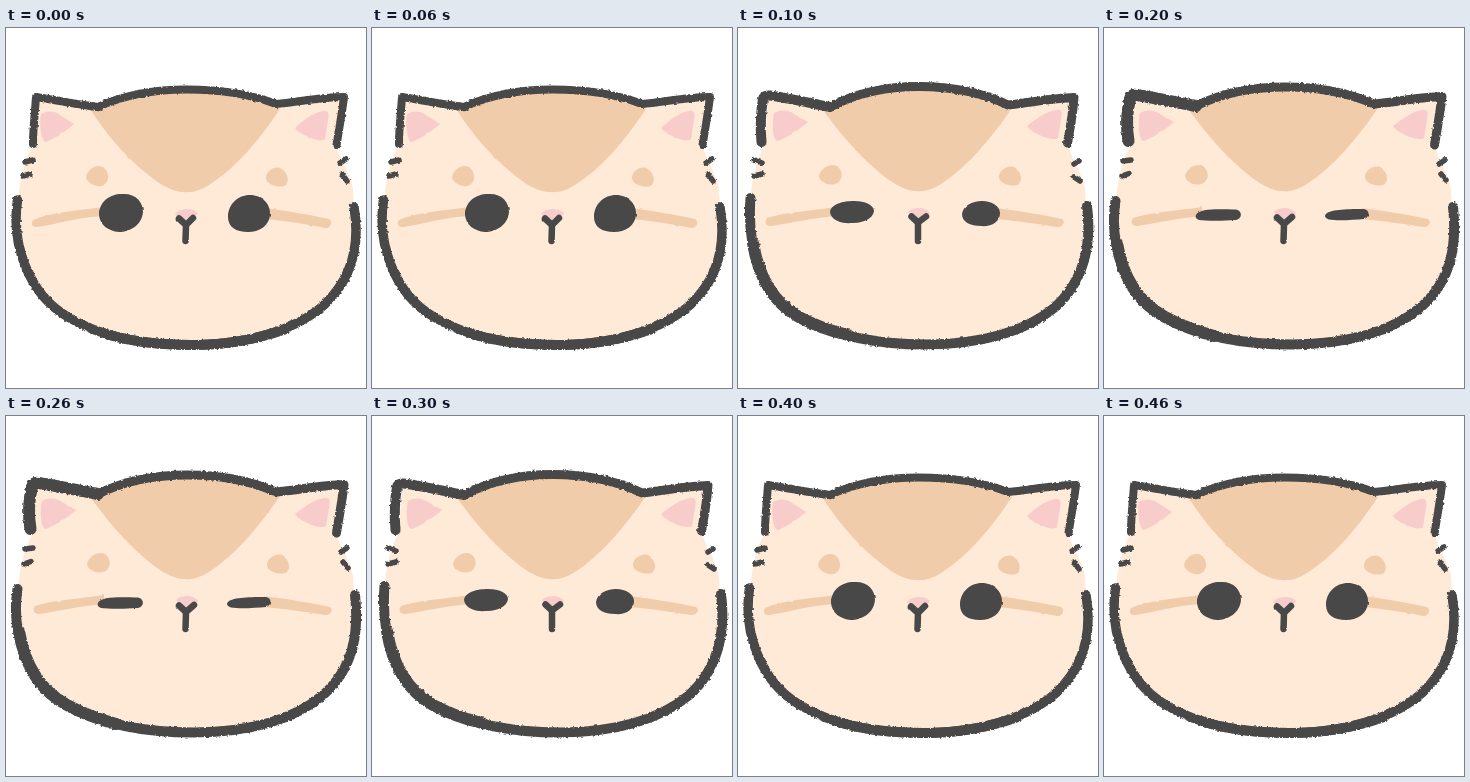
An HTML page for the animation above (0.5 s loop, 360x360 px).

```html
<!DOCTYPE html>
<html lang="en">
<head>
<meta charset="utf-8">
<title>Blinking cat</title>
<style>
  html, body { margin: 0; width: 100%; height: 100%; overflow: hidden; background: #fff; }
  svg { display: block; width: 100vw; height: 100vh; }
  .ink { fill: none; stroke: #484848; stroke-linecap: round; stroke-linejoin: round; }
  .dark { fill: #484848; }
  .tan { fill: #f0ccaa; }
  .pink { fill: #f9cccc; }
</style>
</head>
<body>
<svg viewBox="0 0 360 360">
  <defs>
    <filter id="rough" filterUnits="userSpaceOnUse" x="0" y="0" width="360" height="360" color-interpolation-filters="sRGB">
      <feTurbulence id="grain" type="fractalNoise" baseFrequency="0.38" numOctaves="2" seed="3"/>
      <feDisplacementMap in="SourceGraphic" scale="3" xChannelSelector="R" yChannelSelector="G"/>
    </filter>
    <filter id="soft" filterUnits="userSpaceOnUse" x="0" y="0" width="360" height="360" color-interpolation-filters="sRGB">
      <feTurbulence type="fractalNoise" baseFrequency="0.12" numOctaves="2" seed="8"/>
      <feDisplacementMap in="SourceGraphic" scale="2" xChannelSelector="R" yChannelSelector="G"/>
    </filter>
  </defs>
  <g fill="#ffe9d7">
    <path id="brow"/>
    <path id="cheeks"/>
  </g>
  <g filter="url(#soft)">
    <path id="crown" class="tan"/>
    <path id="marks" class="tan"/>
    <path id="ears" class="pink"/>
    <path id="nose" class="pink"/>
  </g>
  <g class="ink" filter="url(#rough)">
    <path id="top"/>
    <path id="leftEar"/>
    <path id="jaw"/>
    <path id="chin"/>
    <path id="tufts" stroke-width="5.5"/>
  </g>
  <path id="mouth" class="ink" stroke-width="6.5" filter="url(#soft)"/>
  <path id="eyes" class="dark" filter="url(#soft)"/>
</svg>
<script>
const STEP = 100;
const ORDER = [0, 1, 2, 1, 0];

const open = {
  seed: 3, topWidth: 8, earWidth: 8, jawWidth: 9.5, chinWidth: 10,
  leftEar: 'M27 116 C27 100 29 84 30 69 C50 72 72 77 92 79',
  top: 'M92 79 C120 66 149 61.5 181 61.5 C215 61.5 244 66 270 76 C292 74 316 69 338 69 C336 85 333 102 330.5 117',
  jaw: 'M11.5 172 C5 215 22 266 62 289 C95 309 135 317 188 317 C245 317 292 300 318 277 C347 250 354 215 348 179',
  chin: 'M100 306 C126 314 156 317 188 317 C222 317 254 310 280 301',
  tufts: 'M19 134 L27 132 M17 148 L24 146 M334 135 L340 131 M336 146 L341 153',
  crown: 'M84 81 C100 106 124 135 153 155 C172 167 187 167 203 157 C231 139 253 112 274 81 C220 54 138 54 84 81Z',
  marks: 'M80 149 C82 141 90 136 97 139 C104 144 104 155 96 158 C89 159 81 155 80 149Z' +
    'M260 150 C260 143 268 138 274 140 C281 143 284 153 280 157 C275 161 260 157 260 150Z' +
    'M27 192 C45 184 70 183 97 179 L97 188 C72 189 52 196 31 199 C25 199 25 195 27 192Z' +
    'M260 180 C282 183 304 187 323 191 C327 194 325 200 319 200 C301 196 280 193 260 191Z',
  ears: 'M35 86 C42 82 50 83 54 87 L68 96 C60 103 50 110 40 114 C35 114 33 94 35 86Z' +
    'M289 100 C298 92 306 85 317 83 C323 82 323 87 322 92 L319 111 C316 116 294 107 289 100Z',
  nose: 'M169 186 C173 180 187 179 192 185 C189 190 181 195 175 192Z',
  mouth: 'M173 190.5 L180 197 L187 190 M180 197 L179.5 213',
  eyes: 'M93 187 C93 173 105 165 118 166 C130 166 137 174 137 184 C136 197 124 204 113 204 C102 203 94 197 93 187Z' +
    'M222 189 C222 176 232 167 244 167 C256 167 265 176 264 187 C263 198 253 204 242 204 C230 204 222 199 222 189Z'
};

const half = {
  ...open,
  seed: 17, topWidth: 9, earWidth: 10, jawWidth: 10, chinWidth: 12,
  leftEar: 'M23.5 114 C22 98 23 83 25 71 Q26 67 32 67.5 C52 70 74 76 92 79',
  top: 'M92 79 C120 64 148 58.5 181 58.5 C215 58.5 245 65 270 77 C291 75 314 70 336 69.5 C335 85 332 101 329.5 115',
  jaw: 'M12.5 170 C9 214 21 266 61 289 C95 307 135 316.5 188 316.5 C242 316 287 304 316 280 C346 254 354 216 349 178',
  chin: 'M15 215 C21 252 38 276 61 289 C76 297 92 303 110 307',
  tufts: 'M16 132 L24 135 M16 148 L24 146 M336 136 L341 133 M336 149 L342 153',
  crown: 'M85 82 C101 104 125 134 154 154 C173 166 186 166 203 156 C230 138 252 112 274 80 C220 52 138 52 85 82Z',
  marks: 'M81 148 C83 140 92 135 99 138 C106 143 105 154 97 156 C90 158 82 154 81 148Z' +
    'M261 149 C261 142 270 137 276 139 C283 143 285 152 281 156 C276 160 261 156 261 149Z' +
    'M29 190 C48 184 72 183 98 179 L98 188 C73 190 53 195 34 198 C26 198 27 193 29 190Z' +
    'M258 180 C282 183 305 187 324 191 C328 194 325 199 319 199 C301 196 280 193 258 191Z',
  ears: 'M36 85 C43 81 51 82 56 86 L70 94 C61 102 50 109 40 113 C34 113 34 93 36 85Z' +
    'M289 98 C298 91 307 84 318 82 C325 81 324 86 323 92 L320 110 C316 114 294 106 289 98Z',
  nose: 'M170 184 C174 179 187 178 192 185 C189 189 181 194 175 191Z',
  mouth: 'M173.5 188.5 L180 194.5 L188 188.5 M180 194.5 L180 213',
  eyes: 'M92 184 C93 176 105 173 116 173 C127 173 136 177 136 183 C135 191 125 195 114 195 C103 196 93 192 92 184Z' +
    'M224 186 C225 178 234 173 244 173 C254 173 262 178 262 185 C262 194 253 199 243 198 C232 198 224 194 224 186Z'
};

const shut = {
  ...half,
  seed: 29, earWidth: 12,
  leftEar: 'M24.5 113 C22 98 23 83 26 71 Q27 66 33 67 C52 70 74 75 92 78',
  top: 'M92 78 C120 64 148 59 181 59 C215 59 245 65 270 76 C292 74 316 69 338 68.5 C336 85 333 102 330.5 117',
  jaw: 'M11.5 173 C5 214 20 267 61 289 C95 308 135 316.5 188 316.5 C245 316 289 303 317 279 C348 252 353 216 349 179',
  chin: 'M13 215 C19 252 37 276 61 289 C76 297 92 303 110 308',
  tufts: 'M19 133 L27 132 M18 148 L25 145.5 M335 136 L341 132 M337 146 L342 152',
  mouth: 'M173 189.5 L180 196 L188 189 M180 196 L179.5 213',
  eyes: 'M92 187 C94 180 116 181 132 181.5 C139 183 138 191 132 192 C118 193 102 193 95 192 C92 191 91 189 92 187Z' +
    'M222 186 C227 181 246 181 260 181 C266 182 266 189 260 191 C249 192 233 193 225 191.5 C221 190 220 188 222 186Z'
};

const poses = [open, half, shut];
const $ = id => document.getElementById(id);
const pathIds = ['leftEar', 'top', 'jaw', 'chin', 'tufts', 'crown', 'marks', 'ears', 'nose', 'mouth', 'eyes'];
const widths = { leftEar: 'earWidth', top: 'topWidth', jaw: 'jawWidth', chin: 'chinWidth' };

// Upper half of the face, with the cheeks that have no ink line.
const browPath = p => p.top +
  ' C334 133 343 142 347 160 L348 182 L12 182 C13 153 17 136 27 116 L30 70Z';

let shown = -1;
function draw(time) {
  const index = ORDER[Math.floor(time / STEP) % ORDER.length];
  if (index === shown) return;
  shown = index;
  const p = poses[index];
  for (const id of pathIds) $(id).setAttribute('d', p[id]);
  for (const id in widths) $(id).setAttribute('stroke-width', p[widths[id]]);
  $('brow').setAttribute('d', browPath(p));
  $('cheeks').setAttribute('d', p.jaw + 'Z');
  $('grain').setAttribute('seed', p.seed);
}

const start = performance.now();
function tick() {
  draw(performance.now() - start);
  requestAnimationFrame(tick);
}
tick();
</script>
</body>
</html>
```
